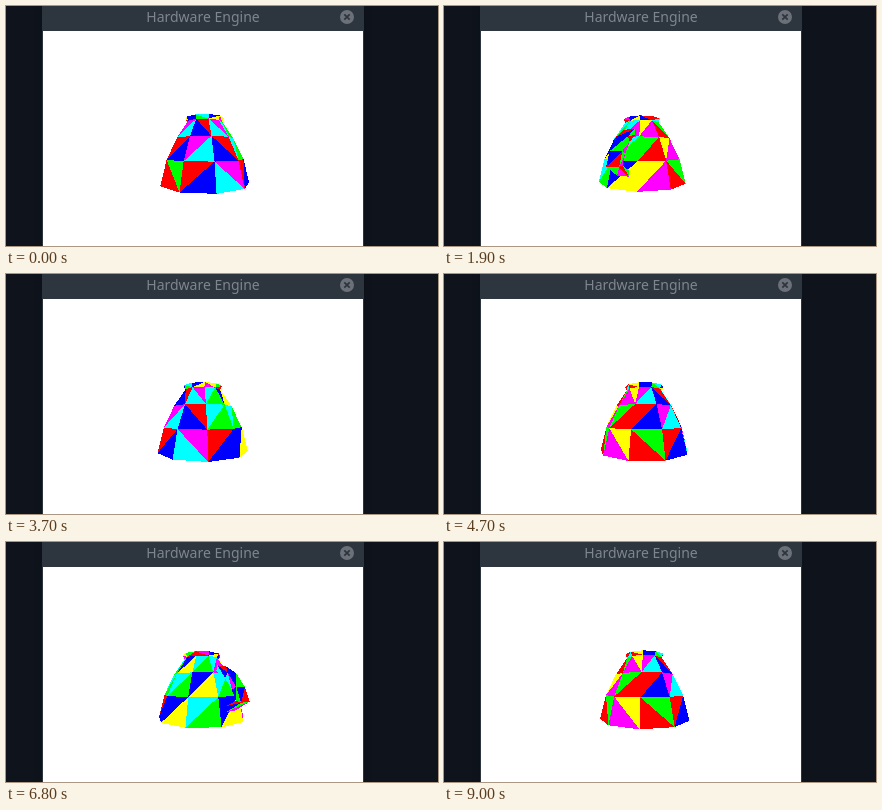
An HTML page with a canvas for the animation above (9100 ms loop, 432 by 240 pixels).

```html
<!DOCTYPE html>
<html lang="en">
<head>
<meta charset="utf-8">
<title>Hardware Engine</title>
<style>
  html, body { margin: 0; width: 100%; height: 100%; overflow: hidden; background: #0f141c; }
  #win { position: absolute; left: 37px; top: 0; width: 320px; height: 240px; background: #fff; box-shadow: 0 0 0 1px #2d353e, 0 0 6px #0b0f15; }
  #bar { height: 25px; background: #2d353e; color: #7f858e; font: 14px/22px "Noto Sans", sans-serif; text-align: center; }
  canvas { position: absolute; left: 0; top: 25px; }
  svg { position: absolute; left: 296px; top: 3px; }
</style>
</head>
<body>
<div id="win">
  <div id="bar">Hardware Engine</div>
  <svg width="16" height="16"><circle cx="8" cy="8" r="7" fill="#6c7179"/><path d="M5.3 5.3l5.4 5.4m0-5.4l-5.4 5.4" stroke="#2d353e" stroke-width="1.8"/></svg>
  <canvas width="320" height="215"></canvas>
</div>
<script>
const W = 320, H = 215, FOCAL = 141.5, LOOP = 9100, STEP = 100;
const ctx = document.querySelector('canvas').getContext('2d');
const image = ctx.createImageData(W, H);
const pixels = new Uint32Array(image.data.buffer);
const depths = new Float32Array(W * H);
const COLORS = { R: 0xff0000ff, G: 0xff00ff00, B: 0xffff0000, C: 0xffffff00, M: 0xffff00ff, Y: 0xff00ffff };
const RAD = Math.PI / 180;

// Cup rings from top to bottom: radius, height
const RINGS = [[.133, -.223], [.122, -.198], [.197, -.085], [.2625, .054], [.3, .208]];
// One entry per facet: diagonal (- rising, + falling), left and right colour
const ROWS = [
  '+RY -BB +GC -BY +MY -GR +RM -BY +BR -RC',
  '+MY -MC +BR +CM -CG -BY -CG -CM -YM +RG',
  '-GR -RB -MC +BR -CG -CG -BY -CG -GR -YM',
  '+MY +RG -RB +CM -RB -BY -CG -BY -YM +RG'
].map(row => row.split(' '));
const SHIFT_X = -.006, CUP_SHIFT_Z = -.018;

// Handle sections: outer radius and height, inner radius and height
const HANDLE = [
  [.18, -.128, .17, -.095], [.26, -.078, .24, -.05], [.318, 0, .288, .014],
  [.347, .078, .315, .07], [.25, .138, .25, .105]
];
const HALF_WIDTH = .037;

let seed = 11;
const randomColor = () => {
  seed = (seed * 16807) % 2147483647;
  return 'RGBCMY'[Math.floor(seed / 2147483647 * 6)];
};

// Points are [right, down, near], with the handle pointing near
const mesh = [];
function addQuad(tl, tr, bl, br, [diagonal, left, right]) {
  if (diagonal === '-') mesh.push([tl, tr, bl, left], [tr, br, bl, right]);
  else mesh.push([tl, bl, br, left], [tl, tr, br, right]);
}
function cupPoint(ring, column) {
  const [radius, height] = RINGS[ring], angle = (column * 36 + 90) * RAD;
  return [radius * Math.sin(angle) + SHIFT_X, height, radius * Math.cos(angle) + CUP_SHIFT_Z];
}
ROWS.forEach((row, r) => row.forEach((facet, k) =>
  addQuad(cupPoint(r, k), cupPoint(r, k + 1), cupPoint(r + 1, k), cupPoint(r + 1, k + 1), facet)));

const corners = ([outR, outH, inR, inH]) => [
  [SHIFT_X - HALF_WIDTH, outH, outR], [SHIFT_X + HALF_WIDTH, outH, outR],
  [SHIFT_X + HALF_WIDTH, inH, inR], [SHIFT_X - HALF_WIDTH, inH, inR]
];
for (let i = 0; i + 1 < HANDLE.length; i++) {
  const a = corners(HANDLE[i]), b = corners(HANDLE[i + 1]);
  for (let j = 0; j < 4; j++) {
    const n = (j + 1) % 4;
    addQuad(a[j], a[n], b[j], b[n], ['-', randomColor(), randomColor()]);
  }
}

function project([x, y, z], sin, cos) {
  const scale = 1 / (1 - (z * cos - x * sin));
  return [161 + FOCAL * (x * cos + z * sin) * scale, 120 + FOCAL * y * scale, scale];
}

function fillTriangle(a, b, c, color) {
  const area = (b[0] - a[0]) * (c[1] - a[1]) - (b[1] - a[1]) * (c[0] - a[0]);
  if (Math.abs(area) < 1e-6) return;
  const xs = [a[0], b[0], c[0]], ys = [a[1], b[1], c[1]];
  const weight = (p, q, x, y) => ((q[0] - p[0]) * (y - p[1]) - (q[1] - p[1]) * (x - p[0])) / area;
  for (let y = Math.floor(Math.min(...ys)); y <= Math.max(...ys); y++)
    for (let x = Math.floor(Math.min(...xs)); x <= Math.max(...xs); x++) {
      const u = weight(b, c, x + .5, y + .5), v = weight(c, a, x + .5, y + .5), w = 1 - u - v;
      if (u < 0 || v < 0 || w < 0) continue;
      const depth = u * a[2] + v * b[2] + w * c[2], i = y * W + x;
      if (depth > depths[i]) {
        depths[i] = depth;
        pixels[i] = color;
      }
    }
}

function draw(time) {
  const angle = (-187 + 86.15 * time / 1000) * RAD;
  const sin = Math.sin(angle), cos = Math.cos(angle);
  pixels.fill(0xffffffff);
  depths.fill(0);
  for (const [a, b, c, color] of mesh)
    fillTriangle(project(a, sin, cos), project(b, sin, cos), project(c, sin, cos), COLORS[color]);
  ctx.putImageData(image, 0, 0);
}

const start = performance.now();
function tick() {
  const time = (performance.now() - start) % LOOP;
  draw(Math.floor(time / STEP) * STEP);
  requestAnimationFrame(tick);
}
tick();
</script>
</body>
</html>
```
